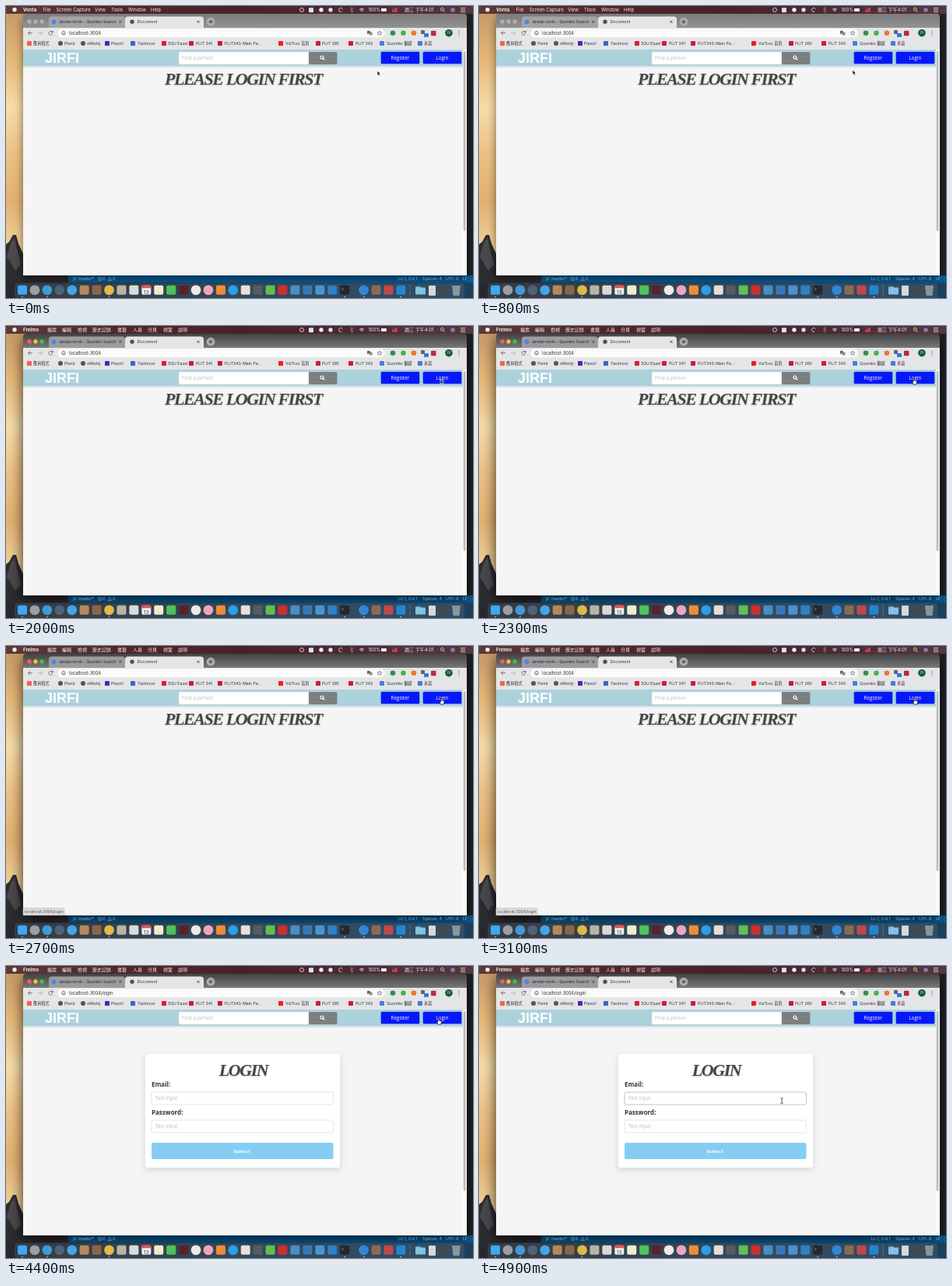
An HTML page with a canvas that plays this animation: 600 by 375 pixels, repeating every 5 s.

```html
<!DOCTYPE html>
<html lang="en">
<head>
<meta charset="utf-8">
<title>Login demo</title>
<style>
  html, body { margin: 0; width: 100%; height: 100%; overflow: hidden; background: #222; }
  canvas { display: block; width: 600px; height: 375px; }
</style>
</head>
<body>
<canvas id="stage"></canvas>
<script>
const canvas = document.getElementById('stage');
const ratio = window.devicePixelRatio || 1;
canvas.width = 600 * ratio;
canvas.height = 375 * ratio;
const c = canvas.getContext('2d');

const UI = 'Inter, "Noto Sans CJK TC", "Noto Sans CJK", sans-serif';
const BODY = '"Open Sans", sans-serif';
const SCRIPT = '"Liberation Serif", serif';
const LOOP = 5000, STEP = 100;

// Moments, in ms, at which the state of the screen switches.
const FOCUS = 2000, HINT = 2600, CLICK = 3300, HINT_END = 3700, LOADED = 4200;

const POINTER_PATH = [
  [700, 477, 83], [800, 480, 82], [900, 480, 82], [1100, 510, 79], [1300, 551, 73],
  [1400, 559, 71], [1500, 564, 69], [1600, 575, 67], [1700, 557, 68],
  [2300, 559, 69], [3100, 560, 69], [4000, 560, 69], [4400, 556, 69],
  [4500, 530, 86], [4600, 465, 122], [4700, 407, 152], [4800, 394, 168], [4900, 389, 173]
];

function rect(x, y, w, h, fill, radius = 0, stroke) {
  c.beginPath();
  c.roundRect(x, y, w, h, radius);
  if (fill) { c.fillStyle = fill; c.fill(); }
  if (stroke) { c.strokeStyle = stroke; c.lineWidth = .7; c.stroke(); }
}

function dot(x, y, r, fill) {
  c.beginPath();
  c.arc(x, y, r, 0, 7);
  c.fillStyle = fill;
  c.fill();
}

function line(points, color, width = .8) {
  c.beginPath();
  points.forEach(([x, y]) => c.lineTo(x, y));
  c.strokeStyle = color;
  c.lineWidth = width;
  c.stroke();
}

function polygon(points, fill, stroke) {
  c.beginPath();
  points.forEach(([x, y]) => c.lineTo(x, y));
  c.closePath();
  c.fillStyle = fill;
  c.fill();
  if (stroke) { c.strokeStyle = stroke; c.lineWidth = .7; c.stroke(); }
}

function text(string, x, y, size, color, { family = UI, style = '', align = 'left', spacing = 0 } = {}) {
  c.font = `${style} ${size}px ${family}`;
  c.textAlign = align;
  c.letterSpacing = spacing + 'px';
  c.fillStyle = color;
  c.fillText(string, x, y);
  c.letterSpacing = '0px';
}

function gradient(x0, y0, x1, y1, ...colors) {
  const g = c.createLinearGradient(x0, y0, x1, y1);
  colors.forEach((color, i) => g.addColorStop(i / (colors.length - 1), color));
  return g;
}

function withShadow(color, blur, offset, paint) {
  c.save();
  c.shadowColor = color;
  c.shadowBlur = blur * ratio;
  c.shadowOffsetY = offset * ratio;
  paint();
  c.restore();
}

function cross(x, y, r, color) {
  line([[x - r, y - r], [x + r, y + r]], color);
  line([[x - r, y + r], [x + r, y - r]], color);
}

function ring(x, y, r, color, from = 0, to = 7, width = .8) {
  c.beginPath();
  c.arc(x, y, r, from, to);
  c.strokeStyle = color;
  c.lineWidth = width;
  c.stroke();
}

function magnifier(x, y, color, width = 1) {
  ring(x - .6, y - .6, 1.9, color, 0, 7, width);
  line([[x + .8, y + .8], [x + 2.8, y + 2.8]], color, width);
}

function star(x, y) {
  c.beginPath();
  for (let i = 0; i < 10; i++) {
    const a = i * Math.PI / 5 - Math.PI / 2, r = i % 2 ? 1.3 : 3;
    c.lineTo(x + r * Math.cos(a), y + r * Math.sin(a));
  }
  c.closePath();
  c.strokeStyle = '#555';
  c.lineWidth = .6;
  c.stroke();
}

function desktop(active) {
  rect(0, 0, 600, 375, gradient(0, 10, 0, 310, '#c79a68', '#e6b878', '#f6dcaa', '#ecc184', '#e2b072', '#f0d09a'));
  polygon([[0, 306], [4, 303], [9, 294], [13, 294], [16, 305], [22, 318], [80, 346], [80, 375], [0, 375]], '#2b2b30');
  polygon([[1, 322], [6, 304], [11, 297], [14, 312], [19, 332], [12, 340]], '#4b494b');
  rect(590, 10, 10, 336, '#202226');
  rect(80, 346, 520, 10, '#075f9c');
  withShadow(`rgba(0,0,0,${active ? .75 : .5})`, active ? 18 : 12, 5, () => rect(22, 11, 570, 335, '#222', 4));

  const pale = '#86b1cf';
  line([[87, 348], [87, 353]], pale, .6);
  line([[90, 348], [90, 350], [87, 351.5]], pale, .6);
  text('master*', 93, 352.4, 5.4, pale);
  ring(120.5, 350.5, 1.9, pale);
  text('0', 124, 352.4, 5.4, pale);
  line([[131, 352.4], [133.3, 348.4], [135.6, 352.4], [131, 352.4]], pale, .6);
  text('0', 137, 352.4, 5.4, pale);
  [['Ln 1, Col 1', 504], ['Spaces: 4', 535], ['UTF-8', 565], ['LF', 587]]
    .forEach(([label, x]) => text(label, x, 352.2, 5.3, pale));
}

function menuBar(active) {
  rect(0, 0, 600, 10, gradient(0, 0, 600, 0, '#5c3a35', '#4d272b', '#482229', '#4b2a32', '#54383f'));
  dot(11, 4.8, 2.7, '#eee');
  const ink = '#f3eeee';
  const items = active
    ? [['檔案', 53], ['編輯', 72], ['檢視', 92], ['歷史記錄', 111], ['書籤', 143], ['人員', 163], ['分頁', 182], ['視窗', 202], ['說明', 221]]
    : [['File', 47.5], ['Screen Capture', 64.5], ['View', 114], ['Tools', 135], ['Window', 157], ['Help', 186]];
  text(active ? 'Frelmo' : 'Vonta', 22, 7.2, 6, ink, { style: 'bold' });
  items.forEach(([label, x]) => text(label, x, 7.2, 6, ink));
  ring(380, 5, 2.5, ink);
  rect(389, 2.2, 6, 6, '#d9e3f4', 1);
  dot(405, 5, 2.7, ink);
  dot(417, 5, 2.7, '#cfe0f0');
  ring(430, 5, 2.5, ink, 1, 6);
  line([[442, 2], [446, 7], [444, 8.5], [444, 1.5], [446, 3], [442, 7]], '#a98d91', .6);
  [1.5, 3, 4.5].forEach(r => ring(457, 7.7, r, ink, -2.35, -.8));
  text('100%', 465.5, 7.2, 5.8, ink);
  rect(482, 3, 7, 4, ink, 1);
  rect(496, 2.3, 7, 5.4, '#d13a43', .5);
  rect(496, 2.3, 3.4, 2.7, '#30439c');
  text('週三 下午4:01', 512, 7.2, 6, ink);
  magnifier(561, 4.8, ink, .8);
  dot(574, 5, 2.8, '#9677bd');
  [2.7, 5, 7.3].forEach(y => line([[584, y], [590, y]], ink));
}

function tabs(active, loading, time) {
  const strip = active ? ['#434343', '#777'] : ['#7c7c7c', '#929292'];
  rect(22, 10, 570, 40, gradient(0, 10, 0, 28, ...strip), [4, 4, 0, 0]);
  (active ? ['#fa5c55', '#f9bd32', '#30c744'] : ['#b0b0b0', '#b0b0b0', '#b0b0b0'])
    .forEach((color, i) => dot(30 + i * 8, 20, 2.7, color));
  rect(55, 13.5, 98, 15, active ? '#9b9c9d' : '#a4a4a4', [4, 4, 0, 0]);
  rect(153, 13.5, 101, 15, '#e4e5e6', [4, 4, 0, 0]);
  dot(61.5, 20.4, 2.8, '#4587ef');
  text('devlan torrik - Quombo Search', 68.5, 22.4, 5, '#222');
  cross(146.8, 20.3, 1.6, '#333');
  if (loading) {
    const turn = time / 130;
    ring(162, 20.3, 2.6, '#367bdc', turn, turn + 4.5);
  } else {
    dot(162, 20.3, 2.7, '#505356');
  }
  text('Document', 168.5, 22.4, 5.3, '#333');
  cross(247, 20.3, 1.6, '#333');
  dot(263, 20.2, 5.4, '#adadad');
  line([[260.4, 20.2], [265.6, 20.2]], '#222');
  line([[263, 17.6], [263, 22.8]], '#222');
}

function toolbar(loading, address) {
  rect(22, 28, 570, 28, '#e4e5e6');
  line([[34, 34.7], [28.5, 34.7], [31, 32.2]], '#555');
  line([[28.5, 34.7], [31, 37.2]], '#555');
  line([[41, 34.7], [46.5, 34.7], [44, 32.2]], '#aaa');
  line([[46.5, 34.7], [44, 37.2]], '#aaa');
  if (loading) cross(57.5, 34.7, 2.2, '#555');
  else {
    ring(57.5, 34.7, 2.4, '#555', .4, 5.6);
    polygon([[60.5, 31.5], [60.5, 34.2], [57.8, 34.2]], '#555');
  }
  rect(66, 29.3, 421, 11, '#fafafa', 5.5);
  ring(74, 34.7, 2.3, '#555');
  line([[74, 34.2], [74, 36.2]], '#555', .7);
  text(address, 81, 36.8, 5.8, '#333');
  rect(464, 31.8, 3.7, 4, '#666', .5);
  rect(467, 33.5, 3.6, 4, '#8a8a8a', .5);
  star(480, 34.8);
  [[497, '#27964a'], [510.5, '#4cb14c'], [524, '#f07828']].forEach(([x, color]) => dot(x, 34.8, 3.3, color));
  rect(533, 31, 5, 5, '#62676b', 1);
  rect(537, 35, 6, 5, '#3478e5', 1);
  rect(546, 31.7, 6.5, 6.5, '#b62d3b', 1);
  dot(569, 34.7, 4.8, '#18583f');
  text('H', 569, 36.4, 4.7, '#fff', { align: 'center' });
  [32.3, 34.7, 37.1].forEach(y => dot(582, y, .6, '#444'));

  const bookmarks = [
    ['應用程式', 27, 35, '#ed6352'], ['Plenk', 67, 75, '#555'], ['oMistly', 96, 104, '#555'],
    ['Plazzi!', 127, 135, '#5b20bb'], ['Tavimoor', 160, 169, '#3168c5'],
    ['ZQU Easel', 200, 208, '#cf2438'], ['PLIT 341', 235, 244, '#c71f36'],
    ['PLIT343-Main Pa...', 272, 281, '#c71f36'], ['VizTroo 首頁', 350, 359, '#f51b25'],
    ['PLIT 365', 398, 406, '#c71f36'], ['PLIT 343', 440, 449, '#c71f36'],
    ['Quombo 翻譯', 480, 489, '#4283df'], ['禾嵐', 529, 537, '#477bd8']
  ];
  bookmarks.forEach(([label, icon, x, color]) => {
    rect(icon, 45, 6, 6, color, color === '#555' ? 3 : 1);
    text(label, x, 50.2, 5.2, '#333');
  });
}

function button(label, x) {
  rect(x - .3, 58.7, 49.6, 15.5, '#0618f8', 1.5);
  text(label, x + 24.5, 69, 6.3, '#fff', { family: BODY, align: 'center' });
}

function headline(string, y) {
  withShadow('rgba(0,0,0,.25)', 2, 1, () =>
    text(string, 305, y, 22, '#454545', { family: SCRIPT, style: 'italic bold', align: 'center', spacing: -1.4 }));
}

function field(label, y, hovered) {
  text(label, 187, y - 7, 8, '#363636', { family: BODY, style: 'bold' });
  rect(187, y, 233.5, 16, '#fff', 2, hovered ? '#aaa' : '#dcdcdc');
  text('Text input', 192, y + 10.2, 6.2, '#bbb', { family: BODY });
}

function page(showForm, hovered) {
  rect(22, 56, 570, 290, '#f5f5f5');
  rect(22, 56, 565, 21, '#abd2dc');
  rect(22, 77, 565, 4, gradient(0, 77, 0, 81, '#dadddd', '#fafafa'));
  text('JIRFI', 50, 73.2, 18, '#fff', { family: '"Liberation Sans", sans-serif', style: 'bold' });
  rect(222, 59, 167, 16, '#fff', [2, 0, 0, 2], '#d8dfe1');
  text('Find a person', 226, 69.2, 6.4, '#bbb', { family: BODY });
  rect(389, 59, 36.5, 16, '#7d7f7f', [0, 2, 2, 0]);
  magnifier(406.5, 66.5, '#fff', 1.2);
  button('Register', 482);
  button('Login', 536);
  rect(587, 56, 5, 290, '#fafafa');
  rect(587.7, 58, 2.8, 231, '#bbb', 1.4);
  if (!showForm) return headline('PLEASE LOGIN FIRST', 101);

  withShadow('rgba(0,0,0,.13)', 8, 3, () => rect(179, 113, 250, 146, '#fff', 3));
  headline('LOGIN', 141);
  field('Email:', 162, hovered);
  field('Password:', 198, false);
  rect(187, 227, 233.5, 21, '#86cdf4', 2);
  text('Submit', 303.5, 240, 6.2, '#fff', { family: '"Liberation Mono", monospace', style: 'bold', align: 'center' });
}

function dock() {
  rect(0, 355, 600, 20, gradient(0, 355, 600, 355, '#26282d', '#20384c', '#1c3f5c'));
  rect(11, 356, 578, 21, 'rgba(120,135,150,.2)', [3, 3, 0, 0]);
  const colors = [
    '#3ba9ef', '#9a9fa4', '#3d9bdc', '#4d6273', '#43a4eb', '#b58859', '#8a6746', '#e4b746',
    '#b9b4a8', '#d6dbd9', '#eee', '#f0ead0', '#4cc35a', '#5a2328', '#eceaea', '#f0a5bd',
    '#ef8c38', '#299ee9', '#e9dcda', '#555b62', '#62bf4e', '#cb302d', '#488dc5', '#3478ba',
    '#4b92cf', '#2f7fc4', '#252729', '#3187d6', '#8a6b52', '#c1484b', '#2684cc'
  ];
  const round = new Set([1, 2, 3, 4, 7, 14, 15, 17, 27]);
  const running = new Set([0, 2, 7, 26, 27, 30]);
  colors.forEach((color, i) => {
    const x = 21 + i * 15.93 + (i > 26 ? 8.5 : 0);
    if (round.has(i)) dot(x, 364.8, 6.4, color);
    else rect(x - 6, 358.8, 12, 12, color, 2);
    if (running.has(i)) dot(x, 373.5, .7, '#eee');
  });
  // Calendar sheet.
  rect(174.3, 358.8, 12, 3.5, '#e4544c', [2, 2, 0, 0]);
  text('13', 180.3, 369.5, 6.5, '#444', { align: 'center' });
  // Terminal prompt.
  line([[431.5, 362], [433, 363.5], [431.5, 365]], '#ddd', .6);
  line([[519, 358], [519, 372]], 'rgba(225,230,235,.4)', .6);
  rect(526, 360, 7, 3, '#65acd6', 1);
  rect(526, 361.5, 13, 9, '#82c3e3', 1);
  rect(543, 359, 9, 13, '#d6d8d7', 1);
  rect(557, 360, 13, 11, '#424a50', 1);
  polygon([[573, 359], [584, 359], [582.5, 372], [574.5, 372]], '#8b949b');
}

function pointerAt(time) {
  const next = POINTER_PATH.findIndex(key => key[0] >= time);
  const [t1, x1, y1] = POINTER_PATH[next];
  if (next === 0) return [x1, y1];
  const [t0, x0, y0] = POINTER_PATH[next - 1];
  const k = (time - t0) / (t1 - t0);
  return [x0 + (x1 - x0) * k, y0 + (y1 - y0) * k];
}

function pointer(time) {
  const [x, y] = pointerAt(time);
  c.save();
  c.translate(x, y);
  if (time >= 4700) {
    line([[-1.6, -3.5], [0, -2.7], [1.6, -3.5]], '#333');
    line([[0, -3], [0, 3]], '#333');
    line([[-1.6, 3.5], [0, 2.7], [1.6, 3.5]], '#333');
  } else if (time > FOCUS && time < 4500) {
    polygon([[-1, -2], [.2, -2], [.4, 1], [3.3, 1.6], [3.6, 3], [2.7, 6], [-.8, 6], [-2.8, 2.5], [-1, 3]], '#fff', '#111');
  } else {
    polygon([[0, 0], [0, 6.2], [1.4, 5], [2.4, 7.2], [3.6, 6.7], [2.6, 4.5], [4.5, 4.4]], '#111', '#fff');
  }
  c.restore();
}

function draw() {
  const time = Math.floor(performance.now() % LOOP / STEP) * STEP;
  const active = time >= FOCUS;
  const loading = time >= CLICK && time < LOADED;
  c.setTransform(ratio, 0, 0, ratio, 0, 0);
  desktop(active);
  menuBar(active);
  tabs(active, loading, time);
  toolbar(loading, 'localhost:3004' + (time >= CLICK ? '/login' : ''));
  page(time >= LOADED, time >= 4800);
  if (time >= HINT && time < HINT_END) {
    rect(22, 336.7, 53, 9, '#dcdddf', [0, 2, 0, 0], '#b9babb');
    text('localhost:3004/login', 24, 343, 5.1, '#555');
  }
  dock();
  pointer(time);
  requestAnimationFrame(draw);
}
requestAnimationFrame(draw);
</script>
</body>
</html>
```
